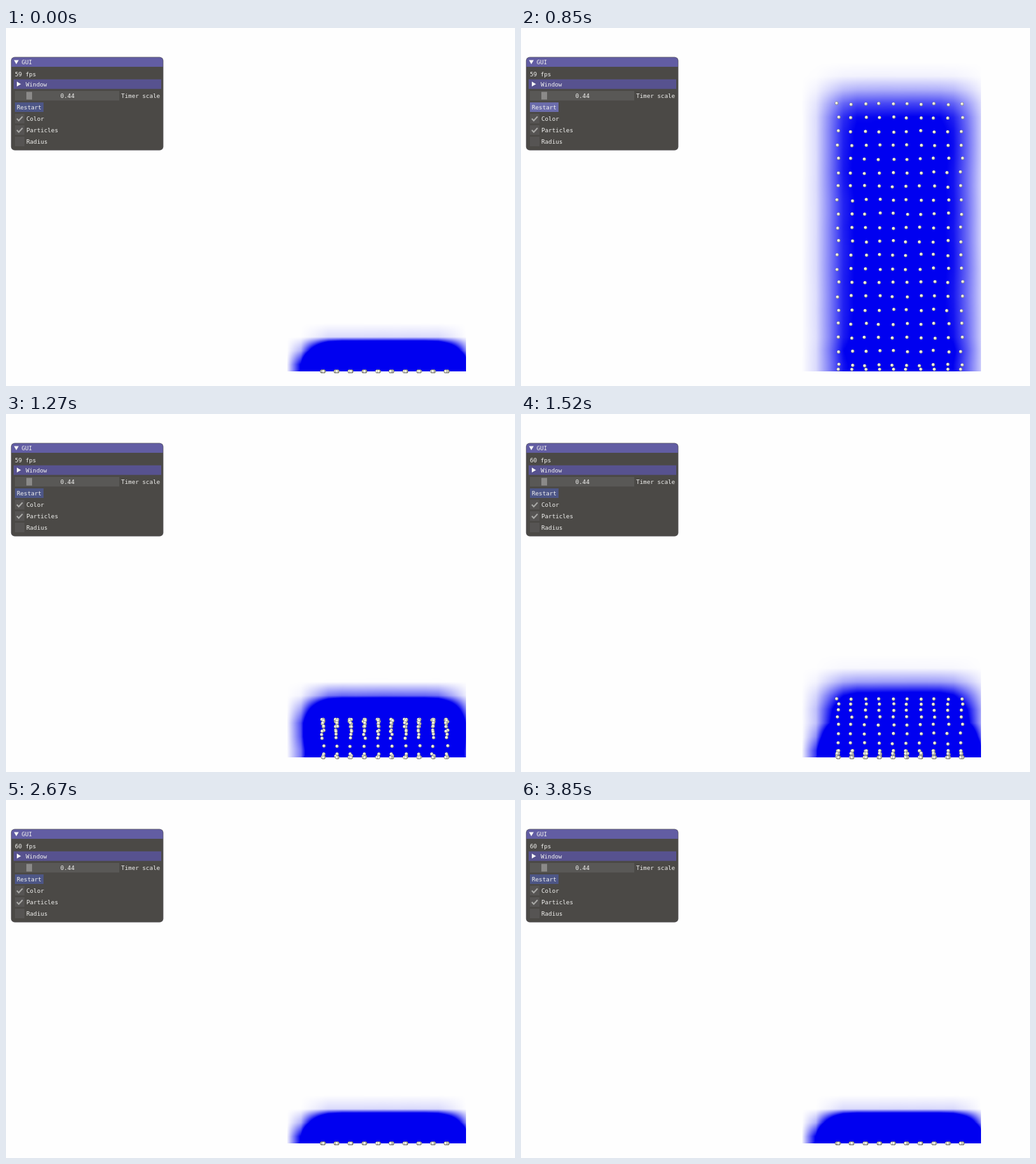
Recreate the animation shown at these times as an HTML page with a canvas. Size 800 px wide and 563 px high, loop 3880 ms.

```html
<!DOCTYPE html>
<html lang="en">
<head>
<meta charset="utf-8">
<title>Particle fluid</title>
<style>
  html, body { margin: 0; width: 100%; height: 100%; overflow: hidden; background: #fefefe; }
  canvas { display: block; }
</style>
</head>
<body>
<canvas id="stage" width="800" height="563"></canvas>
<script>
const ctx = document.getElementById('stage').getContext('2d');
const LOOP = 3880, RESTART = 703;
const GRAVITY = 3411, BOUNCE = 0.461, FLOOR = 540, CELL = 21.6;
const COLS = 14, ROWS = 23, REACH = 65, FULL_DENSITY = 6.7;
const LEFT = 442, TOP = 43, WIDTH = 281, HEIGHT = FLOOR - TOP;
const BLUE = [0, 0, 240], PAPER = 254;

let seed = 7;
function random() {
  seed = (seed * 16807) % 2147483647;
  return seed / 2147483647;
}
const jitter = size => (random() * 2 - 1) * size;

const particles = [];
for (let row = 0; row < 21; row++)
  for (let col = 0; col < 10; col++)
    particles.push({
      x: 498 + col * 21.63 + jitter(1.9),
      drop: FLOOR - 90.5 - row * CELL + jitter(1.4)
    });

// The simulation steps at 30 fps but is shown at 33 fps, so every eleventh tick repeats a step.
function simulationTime(time) {
  const tick = Math.floor((time + 5) * 33 / 1000);
  return (tick - Math.floor((tick + 7) / 11)) * 1000 / 30;
}

// Height above the floor of a particle released from rest, with damped bounces.
function heightAt(drop, time) {
  if (time < 0) return 0;
  const hit = Math.sqrt(2 * drop / GRAVITY);
  if (time < hit) return drop - GRAVITY * time * time / 2;
  let speed = BOUNCE * GRAVITY * hit;
  let rest = time - hit;
  while (speed > 8) {
    const flight = 2 * speed / GRAVITY;
    if (rest < flight) return speed * rest - GRAVITY * rest * rest / 2;
    rest -= flight;
    speed *= BOUNCE;
  }
  return 0;
}

// Density sampled on a coarse grid, interpolated per pixel, then clamped to a colour.
const density = new Float32Array(COLS * ROWS);
const image = ctx.createImageData(WIDTH, HEIGHT);

function sampleDensity() {
  density.fill(0);
  for (const p of particles)
    for (let j = 0; j < ROWS; j++) {
      const dy = FLOOR - CELL * (j + 0.5) - p.y;
      if (Math.abs(dy) >= REACH) continue;
      for (let i = 0; i < COLS; i++) {
        const dx = LEFT + CELL * i - p.x;
        const q = 1 - (dx * dx + dy * dy) / (REACH * REACH);
        if (q > 0) density[j * COLS + i] += q * q * q / FULL_DENSITY;
      }
    }
}

function drawField() {
  sampleDensity();
  const data = image.data;
  let k = 0;
  for (let y = 0; y < HEIGHT; y++) {
    const v = Math.min(ROWS - 1.001, Math.max(0, (HEIGHT - y - 0.5) / CELL - 0.5));
    const j = Math.floor(v), fy = v - j;
    for (let x = 0; x < WIDTH; x++) {
      const u = Math.min(COLS - 1.001, (x + 0.5) / CELL);
      const i = Math.floor(u), fx = u - i, n = j * COLS + i;
      const near = density[n] + (density[n + 1] - density[n]) * fx;
      const far = density[n + COLS] + (density[n + COLS + 1] - density[n + COLS]) * fx;
      const amount = Math.min(1, near + (far - near) * fy);
      for (const channel of BLUE) data[k++] = PAPER + (channel - PAPER) * amount;
      data[k++] = 255;
    }
  }
  ctx.putImageData(image, LEFT, TOP);
}

function drawParticles() {
  for (const p of particles) {
    const shade = ctx.createRadialGradient(p.x - 0.8, p.y - 0.8, 0.3, p.x, p.y, 2.8);
    shade.addColorStop(0, '#fffffa');
    shade.addColorStop(0.55, '#dcdcd2');
    shade.addColorStop(1, '#77776e');
    ctx.fillStyle = shade;
    ctx.beginPath();
    ctx.arc(p.x, p.y, 2.7, 0, Math.PI * 2);
    ctx.fill();
  }
}

function box(x, y, w, h, color, radius = 0) {
  ctx.fillStyle = color;
  ctx.beginPath();
  ctx.roundRect(x, y, w, h, radius);
  ctx.fill();
}

function label(text, x, middle) {
  ctx.fillStyle = '#f2f2f0';
  ctx.fillText(text, x, middle + 3.3);
}

function triangle(...points) {
  ctx.fillStyle = '#f4f4f6';
  ctx.beginPath();
  for (const [x, y] of points) ctx.lineTo(x, y);
  ctx.fill();
}

function checkbox(text, y, checked) {
  box(14, y, 15, 15, '#565453');
  if (checked) {
    ctx.strokeStyle = '#a9a9a7';
    ctx.lineWidth = 2;
    ctx.beginPath();
    ctx.moveTo(17, y + 7.5);
    ctx.lineTo(20, y + 10.7);
    ctx.lineTo(26, y + 4.2);
    ctx.stroke();
  }
  label(text, 32, y + 8);
}

function drawPanel(time) {
  const fps = time < 1300 ? 59 : 60;
  const hovered = time > 400 && time < 960;
  ctx.font = '9.23px "DejaVu Sans Mono", monospace';

  box(7.8, 45.6, 239.6, 146.8, '#66656a', 6);
  box(8.5, 46.3, 238.2, 145.4, '#4b4946', 5);
  box(8.5, 46.3, 238.2, 14.7, '#625da3', [5, 5, 0, 0]);
  triangle([12.5, 50.5], [20, 50.5], [16.2, 57]);
  label('GUI', 24.5, 54);
  label(fps + ' fps', 14, 72.5);

  box(12, 80.7, 232, 15, '#57528f');
  triangle([17, 84.3], [23.6, 88.2], [17, 92.1]);
  label('Window', 31, 88.5);

  box(14, 99, 164, 15, '#595856');
  box(32, 100.5, 9, 12, '#8b8a89');
  label('0.44', 85.5, 106.5);
  label('Timer scale', 181, 106.5);

  box(14, 117, 45, 15, hovered ? '#6b6cab' : '#4d5686');
  label('Restart', 17, 124.5);

  checkbox('Color', 135, true);
  checkbox('Particles', 153, true);
  checkbox('Radius', 171, false);
}

let start;
function draw(now) {
  start ??= now;
  const time = (now - start) % LOOP;
  const elapsed = (simulationTime(time) - RESTART) / 1000;
  for (const p of particles) p.y = FLOOR - heightAt(p.drop, elapsed);
  ctx.fillStyle = '#fefefe';
  ctx.fillRect(0, 0, 800, 563);
  drawField();
  drawParticles();
  drawPanel(time);
  requestAnimationFrame(draw);
}
requestAnimationFrame(draw);
</script>
</body>
</html>
```
